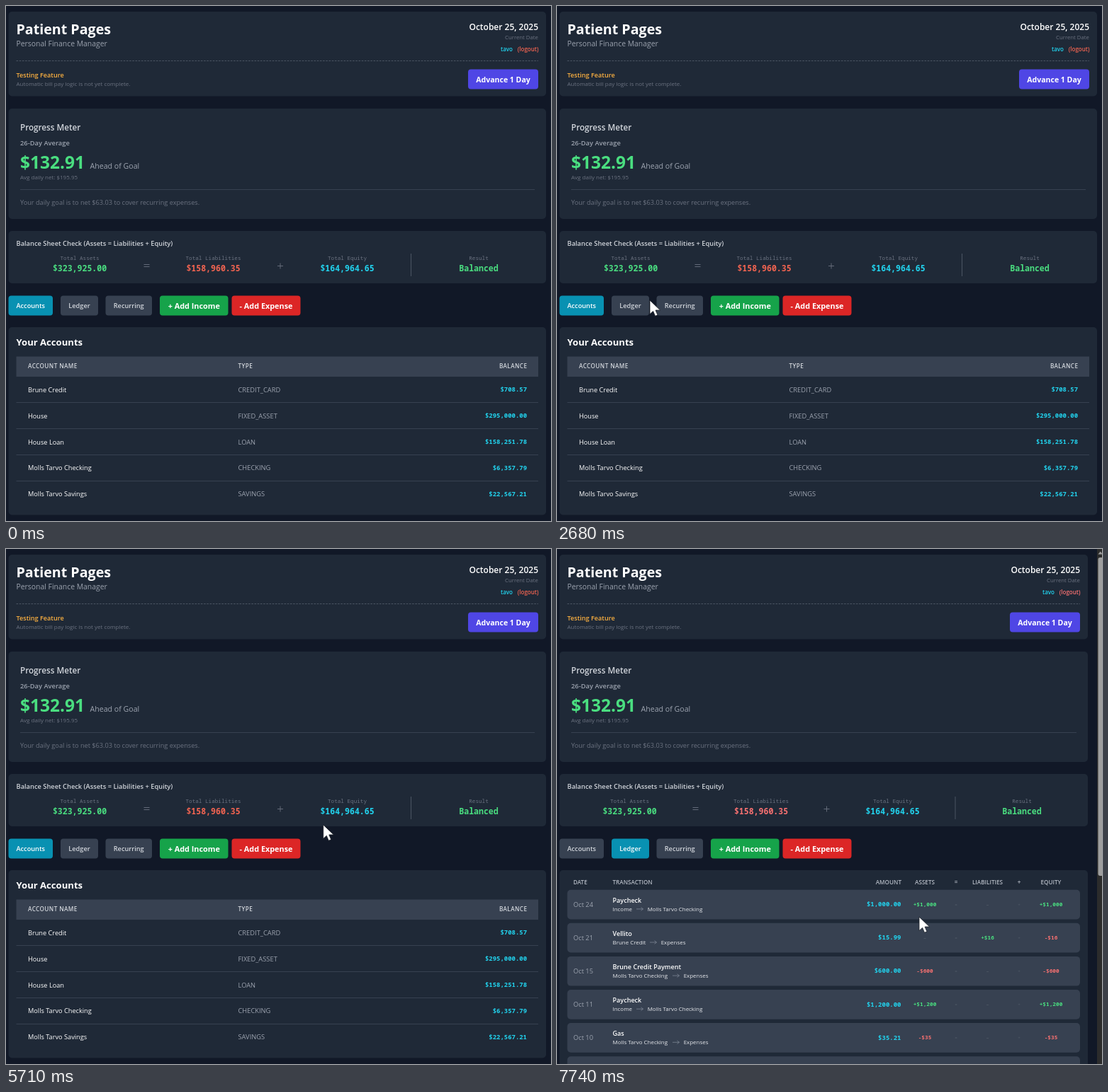
These frames come from a looping animation (769x728 px, 8 s). An HTML page:

```html
<!DOCTYPE html>
<html lang="en">
<head>
<meta charset="utf-8">
<title>Personal Finance Manager</title>
<style>
  html, body { margin: 0; width: 100%; height: 100%; overflow: hidden; background: #111827; }
  svg { display: block; width: 769px; height: 728px; }
  text { font-family: "Open Sans", "Noto Sans", sans-serif; white-space: pre; }
  .mono { font-family: "Noto Sans Mono", "DejaVu Sans Mono", monospace; }
</style>
</head>
<body>
<svg id="stage" viewBox="0 0 769 728">
  <g id="accounts"></g>
  <g id="ledger"></g>
  <circle id="click" cx="100" cy="429" r="16" fill="#d6cc00" fill-opacity=".65"/>
  <g id="cursor" fill="#fff" stroke="#1b1f27" stroke-width=".8" stroke-linejoin="round">
    <path id="arrow" d="M0 0V19.5L4.6 15.4 7.6 22.3 11 20.8 8.1 14H14.6Z"/>
    <g id="hand">
      <path d="M-2.2 1.8Q0-1.4 2.2 1.8V10Q4.5 9 5.4 11Q8 10.4 8.6 12.4Q11 12.4 11 15V19Q11 23 8.5 26.5H-3.5Q-5 23-9 17.5Q-10 14.3-7 14.8L-2.2 18Z"/>
      <path fill="none" d="M2.2 10V14M5.4 11V14.5M8.6 12.4V15"/>
    </g>
  </g>
</svg>
<script>
const LOOP = 8000, SWITCH = 6400;
const $ = id => document.getElementById(id);
const C = {
  card: '#1f2937', line: '#374151', dim: '#4b5563', mute: '#6b7280', soft: '#9ca3af',
  pale: '#d1d5db', white: '#fff', green: '#4ade80', cyan: '#22d3ee', red: '#f87171'
};

// Markup helpers
const rect = (x, y, w, h, fill, r = 0, extra = '') =>
  `<rect x="${x}" y="${y}" width="${w}" height="${h}" rx="${r}" fill="${fill}" ${extra}/>`;
const text = (x, y, s, size, fill, weight = 400, anchor = 'start', extra = '') =>
  `<text x="${x}" y="${y}" font-size="${size}" fill="${fill}" font-weight="${weight}" text-anchor="${anchor}" ${extra}>${s}</text>`;
const mono = (x, y, s, size, fill, weight = 700, anchor = 'middle') =>
  text(x, y, s, size, fill, weight, anchor, 'class="mono"');
const stroke = (d, color, extra = '') => `<path d="${d}" stroke="${color}" fill="none" ${extra}/>`;

// x, width, label, fill, hover fill
const buttons = [
  [3.5, 62.5, 'Accounts', C.line, C.dim],
  [77, 53, 'Ledger', C.line, C.dim],
  [140.5, 65.5, 'Recurring', C.line, C.dim],
  [217, 96.5, '+ Add Income', '#16a34a', '#15803d'],
  [318.5, 97, '- Add Expense', '#dc2626', '#b91c1c']
];
const ACTIVE = '#0891b2', TOP = 409.5, HIGH = 28;

// Everything above the table; right is the inner right edge
function frame(right, red, active, cols) {
  const w = right + 11 - 3.5, end = 'end';
  let s = rect(3.5, 8, w, 119.5, C.card, 5) + rect(3.5, 145, w, 156, C.card, 5) + rect(3.5, 318, w, 74, C.card, 5);

  s += text(14.5, 40, 'Patient Pages', 19.65, C.white, 700)
    + text(14.5, 56.5, 'Personal Finance Manager', 10.42, C.soft)
    + text(right, 34, 'October 25, 2025', 12, C.white, 600, end)
    + text(right, 46.7, 'Current Date', 7.8, C.mute, 400, end)
    + text(right - 36, 63.5, 'tavo', 8, C.cyan, 600, end)
    + text(right + .5, 63.5, '(logout)', 8, red, 600, end)
    + stroke(`M14.5 77.5H${right}`, C.dim, 'stroke-dasharray="2.6 1.6"')
    + text(14.5, 100.5, 'Testing Feature', 9.1, '#fbb040', 600)
    + text(14.5, 113, 'Automatic bill pay logic is not yet complete.', 8, C.mute)
    + rect(right - 99, 89.5, 99, 28, '#4f46e5', 4)
    + text(right - 49.5, 107.5, 'Advance 1 Day', 10.55, C.white, 700, 'middle');

  s += text(20, 176, 'Progress Meter', 11.67, C.pale, 600)
    + text(20, 197, '26-Day Average', 9.35, C.soft, 600)
    + text(20, 230, '$132.91', 24.5, C.green, 700)
    + text(118.5, 230, 'Ahead of Goal', 10.6, C.soft)
    + text(20, 244.7, 'Avg daily net: $195.95', 8, C.mute)
    + stroke(`M20 259.5H${right - 5}`, C.line)
    + text(20, 281, 'Your daily goal is to net $63.03 to cover recurring expenses.', 9.18, C.mute);

  const [a, eq, l, plus, e, bar, res] = cols;
  s += text(14.5, 339.3, 'Balance Sheet Check (Assets = Liabilities + Equity)', 9.3, C.pale, 600)
    + stroke(`M${bar} 350V382`, C.dim);
  [[a, 'Total Assets', '$323,925.00', C.green], [l, 'Total Liabilities', '$158,960.35', red],
   [e, 'Total Equity', '$164,964.65', C.cyan], [res, 'Result', 'Balanced', C.green]]
    .forEach(([x, name, val, color]) => {
      s += mono(x, 358.5, name, 7.65, C.mute, 400) + mono(x, 375, val, 11.55, color);
    });
  s += stroke(`M${eq - 4} 365.5h8m-8 3h8M${plus - 4} 367.5h8m-4-4v8`, C.mute, 'stroke-width=".9"');

  buttons.forEach(([x, bw, name, fill], i) => {
    const big = i > 2;
    s += rect(x, TOP, bw, HIGH, i === active ? ACTIVE : fill, 4, 'class="btn"')
      + text(x + bw / 2, big ? 427.5 : 427, name, big ? 10.85 : 9.2,
        big || i === active ? C.white : C.pale, big ? 700 : 600, 'middle');
  });
  return s;
}

function accountsPage() {
  let s = frame(751, '#f26451', 0, [104, 198.5, 292.5, 387, 481.5, 571.5, 667])
    + rect(3.5, 454, 758.5, 265.5, C.card, 5)
    + text(14.5, 480, 'Your Accounts', 13.1, C.white, 700)
    + rect(14.5, 495.5, 736.5, 28.5, C.line);
  const head = (x, t, anchor) => text(x, 512, t, 8.2, C.pale, 600, anchor, 'letter-spacing=".4"');
  s += head(31, 'ACCOUNT NAME') + head(327.5, 'TYPE') + head(735.4, 'BALANCE', 'end');
  [['Brune Credit', 'CREDIT_CARD', '$708.57'],
   ['House', 'FIXED_ASSET', '$295,000.00'],
   ['House Loan', 'LOAN', '$158,251.78'],
   ['Molls Tarvo Checking', 'CHECKING', '$6,357.79'],
   ['Molls Tarvo Savings', 'SAVINGS', '$22,567.21']].forEach(([name, type, sum], i) => {
    const y = 545.7 + i * 36.9;
    s += text(31, y, name, 9.2, C.white) + text(327.5, y, type, 9.3, C.soft)
      + mono(735, y - .5, sum, 8.95, C.cyan, 700, 'end');
    if (i < 4) s += stroke(`M14.5 ${Math.round(560 + i * 36.9) + .5}H751`, C.line);
  });
  return s;
}

function ledgerPage() {
  let s = frame(738, C.red, 1, [102.5, 195.5, 288, 380.5, 473.5, 562, 656])
    + rect(3.5, 454, 745.5, 290, C.card, 5);
  [[23, 'DATE', 'start'], [78.5, 'TRANSACTION', 'start'], [486, 'AMOUNT', 'end'], [519, 'ASSETS', 'middle'],
   [563, '=', 'middle'], [607.5, 'LIABILITIES', 'middle'], [652, '+', 'middle'], [697, 'EQUITY', 'middle']]
    .forEach(([x, t, anchor]) => { s += text(x, 474, t, 8.15, '#b4bac4', 600, anchor); });

  const bank = 'Molls Tarvo Checking', out = 'Expenses';
  // date, title, from, arrow x, to, amount, assets, liabilities, equity
  [['Oct 24', 'Paycheck', 'Income', 112, bank, '$1,000.00', '+$1,000', '', '+$1,000'],
   ['Oct 21', 'Vellito', 'Brune Credit', 131, out, '$15.99', '', '+$16', '-$16'],
   ['Oct 15', 'Brune Credit Payment', bank, 163, out, '$600.00', '-$600', '', '-$600'],
   ['Oct 11', 'Paycheck', 'Income', 112, bank, '$1,200.00', '+$1,200', '', '+$1,200'],
   ['Oct 10', 'Gas', bank, 163, out, '$35.21', '-$35', '', '-$35'],
   null].forEach((row, i) => {
    const y = 481.7 + i * 47.1;
    s += rect(14.5, y, 723.5, 41.7, C.line, 5);
    if (!row) return;
    const [date, title, from, ax, to, sum, ...parts] = row;
    s += text(23, y + 24.3, date, 9.3, C.soft)
      + text(78.5, y + 18, title, 9.05, C.white, 600)
      + text(78.5, y + 30, from, 7.95, '#e5e7eb')
      + stroke(`M${ax} ${y + 27.2}h9.5m-3-2.3l3 2.3l-3 2.3`, '#7b8493', 'stroke-width=".8"')
      + text(ax + 15.7, y + 30, to, 7.95, '#e5e7eb')
      + mono(485.5, y + 23.5, sum, 9, C.cyan, 700, 'end')
      + mono(563, y + 23, '=', 6, C.dim) + mono(652, y + 23, '+', 6, C.dim);
    parts.forEach((p, k) => {
      s += mono([519, 607.5, 697][k], y + 22.8, p || '–', 7.8, !p ? C.dim : p[0] === '+' ? C.green : C.red);
    });
  });
  // Scrollbar
  return s + rect(762, 0, 7, 728, '#2c2c2c') + rect(763.5, 12, 8, 450, '#9f9f9f', 3)
    + '<path d="M763.5 7.5L766.7 3.5 769.9 7.5Z" fill="#9f9f9f"/>';
}

$('accounts').innerHTML = accountsPage();
$('ledger').innerHTML = ledgerPage();

// Cursor path: time, x, y
const path = [
  [280, 729, 714], [1070, 491, 538], [1340, 379, 501], [1890, 160, 426], [2410, 132, 417], [2680, 131, 416],
  [2880, 131, 416], [2940, 129, 413], [3150, 121, 411], [3300, 133, 408], [3710, 270, 382], [3780, 288, 384],
  [4050, 288, 384], [4570, 473, 385], [4850, 473, 385], [4910, 494, 383], [5240, 672, 364],
  [5440, 672, 364], [6130, 101, 430], [6740, 101, 430], [7050, 240, 500], [7330, 420, 550],
  [7540, 503, 533], [7740, 511, 520], [LOOP, 511, 520]
];

function cursorAt(t) {
  const i = Math.max(1, path.findIndex(p => p[0] > t));
  const [t0, x0, y0] = path[i - 1], [t1, x1, y1] = path[i];
  const k = Math.max(0, (t - t0) / (t1 - t0));
  return [x0 + (x1 - x0) * k, y0 + (y1 - y0) * k];
}

const pages = [$('accounts'), $('ledger')];
const rects = pages.map(p => [...p.querySelectorAll('.btn')]);
const show = (el, on) => el.setAttribute('visibility', on ? 'visible' : 'hidden');

function draw(t) {
  const page = t < SWITCH ? 0 : 1;
  const [x, y] = cursorAt(t);
  const over = t < 280 ? -1 : buttons.findIndex(([bx, bw]) =>
    x >= bx && x <= bx + bw && y >= TOP && y <= TOP + HIGH);
  pages.forEach((p, i) => { p.style.display = i === page ? '' : 'none'; });
  rects[page].forEach((r, i) =>
    r.setAttribute('fill', i === page ? ACTIVE : buttons[i][i === over ? 4 : 3]));
  show($('arrow'), t >= 280 && over < 0);
  show($('hand'), over >= 0);
  show($('click'), t >= 6200 && t < SWITCH);
  $('cursor').setAttribute('transform', `translate(${x.toFixed(1)} ${y.toFixed(1)})`);
}

const start = performance.now();
function tick() {
  draw((performance.now() - start) % LOOP);
  requestAnimationFrame(tick);
}
tick();
</script>
</body>
</html>
```
